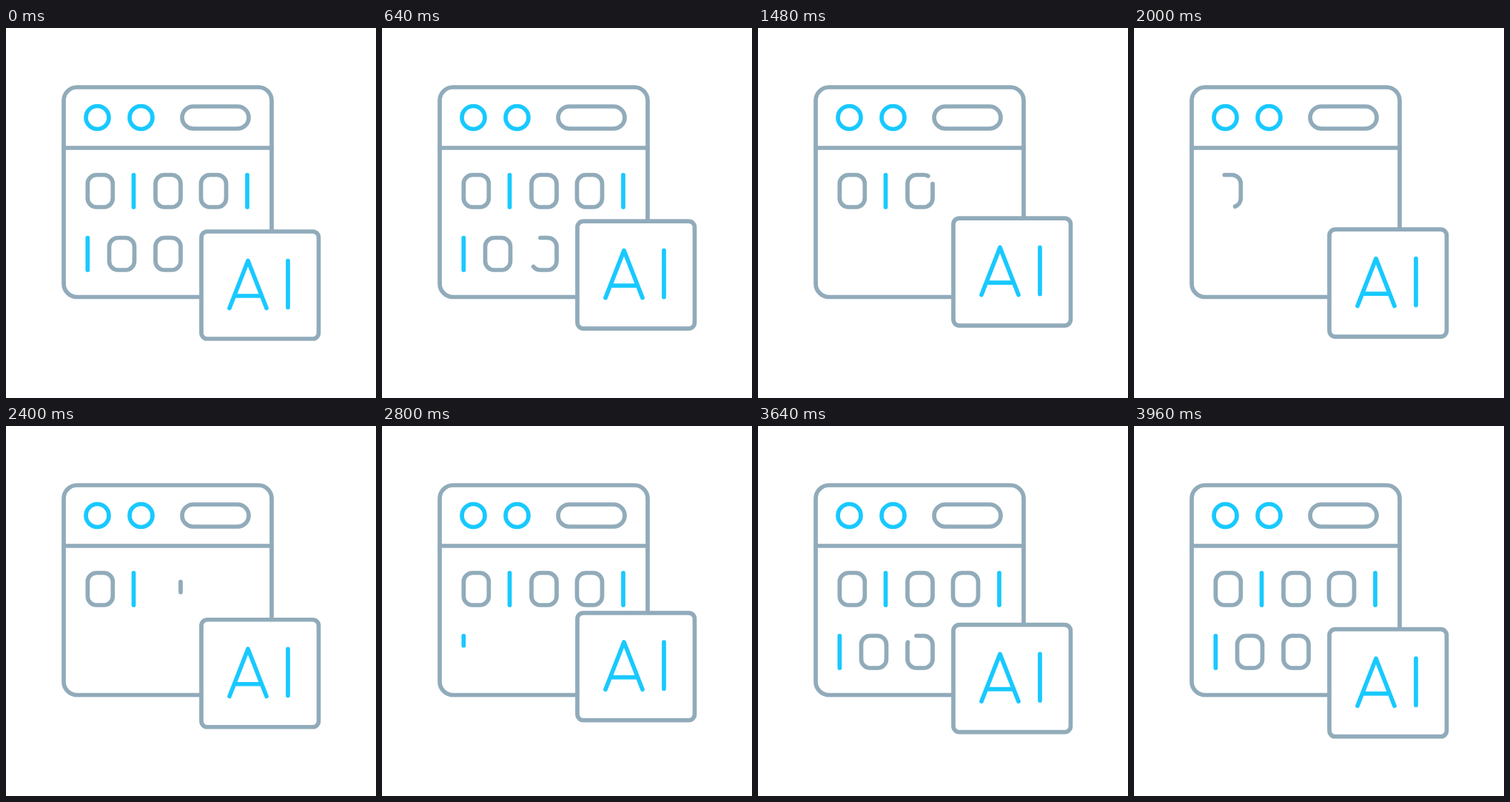
An HTML page for the animation above (4 s loop, 500 px wide and 500 px high).

```html
<!DOCTYPE html>
<html lang="en">
<head>
<meta charset="utf-8">
<title>AI code window</title>
<style>
  html, body { margin: 0; width: 100%; height: 100%; overflow: hidden; background: #fff; }
  svg { display: block; width: 100%; height: 100%; }
  svg * { fill: none; stroke-width: 5.7; stroke-linecap: round; stroke-linejoin: round; }
  .gray { stroke: #91abba; }
  .blue { stroke: #18c9ff; }
  #card rect { fill: #fff; }
</style>
</head>
<body>
<svg viewBox="0 0 500 500">
  <rect class="gray" x="78" y="80" width="281" height="283.5" rx="18"/>
  <path class="gray" d="M78 162H359"/>
  <circle class="blue" cx="123.5" cy="121" r="15.5"/>
  <circle class="blue" cx="182.5" cy="121" r="15.5"/>
  <rect class="gray" x="238" y="106" width="90" height="30" rx="15"/>
  <g id="digits"></g>
  <g id="card">
    <rect class="gray" x="264" y="275" width="158.5" height="145" rx="8"/>
    <path class="blue" d="M302 378.5L327 314.5L352 378.5M309 362H345M381 314.5V377.5"/>
  </g>
</svg>
<script>
const STEP = 40, FRAMES = 100, LAST = 50;
const TRIM_TIME = 2720, FLOAT_PERIOD = 2260, FLOAT_HEIGHT = 23;
const ROW_1 = 198.5, ROW_2 = 283.5, W = 34, H = 43.5, R = 12;

const arc = (dx, dy) => `a${R} ${R} 0 0 1 ${dx} ${dy}`;
const zero = (x, y) => `M${x + R} ${y}h${W - 2 * R}${arc(R, R)}v${H - 2 * R}${arc(-R, R)}` +
  `h${2 * R - W}${arc(-R, -R)}v${2 * R - H}${arc(R, -R)}`;
const zeroFromRight = (x, y) => `M${x + W} ${y + R}v${H - 2 * R}${arc(-R, R)}` +
  `h${2 * R - W}${arc(-R, -R)}v${2 * R - H}${arc(R, -R)}h${W - 2 * R}${arc(R, R)}`;
const one = (x, y) => `M${x} ${y}v${H}`;

// Writing order
const digits = [
  [zero, 110.3, ROW_1], [one, 172.5, ROW_1], [zeroFromRight, 202, ROW_1],
  [zero, 263.5, ROW_1], [one, 326, ROW_1],
  [one, 110.3, ROW_2], [zero, 139.5, ROW_2], [zero, 202, ROW_2]
].map(([shape, x, y]) => {
  const path = document.createElementNS('http://www.w3.org/2000/svg', 'path');
  path.setAttribute('class', shape === one ? 'blue' : 'gray');
  path.setAttribute('d', shape(x, y));
  document.getElementById('digits').append(path);
  return { path, length: path.getTotalLength() };
});
const total = digits.reduce((sum, d) => sum + d.length, 0);
const card = document.getElementById('card');

// cubic-bezier(2/3, 0, 1/3, 1), solved by bisection
function ease(x) {
  const bezier = (s, a, b) => 3 * (1 - s) ** 2 * s * a + 3 * (1 - s) * s * s * b + s ** 3;
  let low = 0, high = 1;
  for (let i = 0; i < 24; i++) {
    const mid = (low + high) / 2;
    if (bezier(mid, 2 / 3, 1 / 3) < x) low = mid; else high = mid;
  }
  return bezier(low, 0, 1);
}

function draw(time) {
  const lift = FLOAT_HEIGHT / 2 * (1 - Math.cos(2 * Math.PI * time / FLOAT_PERIOD));
  card.setAttribute('transform', `translate(0 ${-lift})`);

  let left = total * (1 - ease(time / TRIM_TIME));
  for (const { path, length } of digits) {
    const shown = Math.min(left, length);
    path.style.display = shown > 0.01 ? '' : 'none';
    path.style.strokeDasharray = shown < length ? `${shown} ${length * 2}` : 'none';
    left = Math.max(0, left - length);
  }
}

// Plays forward, then backward, with the turning pose held for two steps
const start = performance.now();
function tick() {
  const n = Math.floor(Math.max(0, performance.now() - start) / STEP) % FRAMES;
  draw(STEP * (n > LAST ? 2 * LAST + 1 - n : n));
  requestAnimationFrame(tick);
}
tick();
</script>
</body>
</html>
```
